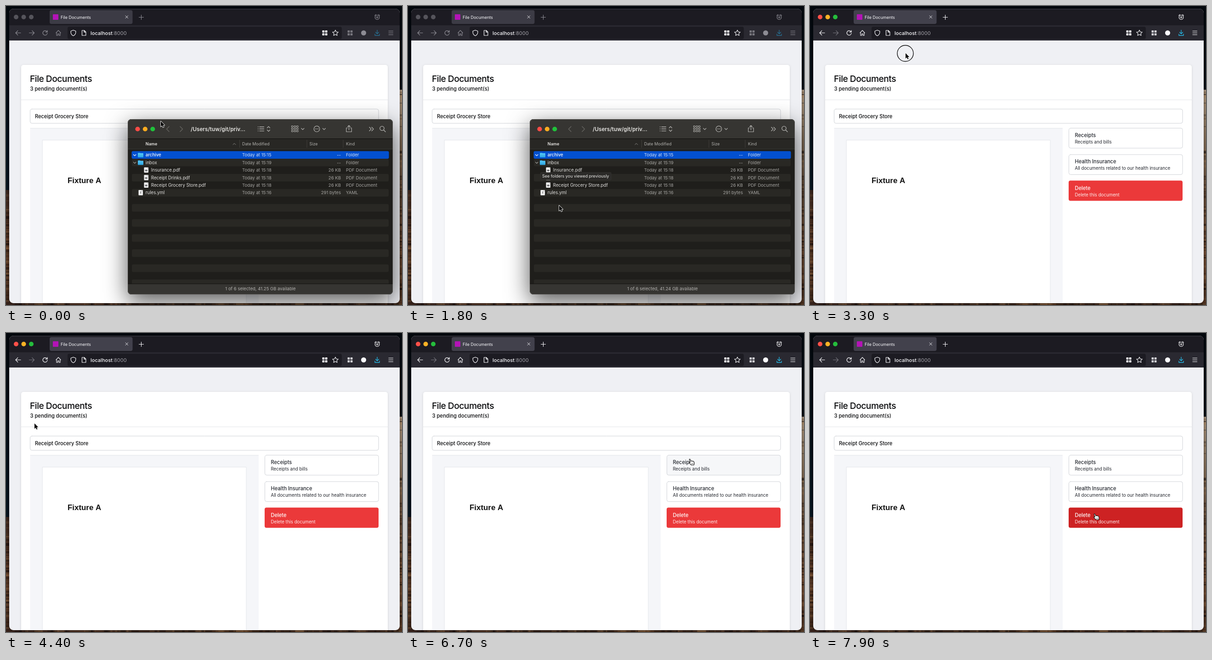
Animation of 862x650 px, one loop 8 s. Source, as an HTML page with a canvas:

```html
<!DOCTYPE html>
<html lang="en">
<head>
<meta charset="utf-8">
<title>File Documents</title>
<style>
  html, body { margin: 0; width: 100%; height: 100%; overflow: hidden; background: #02060c; }
  canvas { display: block; width: 862px; height: 650px; }
</style>
</head>
<body>
<canvas id="stage" width="862" height="650"></canvas>
<script>
const ctx = document.getElementById('stage').getContext('2d');
const LOOP = 8000, FOCUS_AT = 3300;
const SANS = 'Inter, "Open Sans", sans-serif';

// ---------- drawing helpers ----------
function rect(x, y, w, h, fill, radius = 0, stroke) {
  ctx.beginPath();
  ctx.roundRect(x, y, w, h, radius);
  if (fill) { ctx.fillStyle = fill; ctx.fill(); }
  if (stroke) { ctx.strokeStyle = stroke; ctx.lineWidth = 1; ctx.stroke(); }
}
function circle(x, y, r, fill, stroke, width = 1.2) {
  ctx.beginPath();
  ctx.arc(x, y, r, 0, Math.PI * 2);
  if (fill) { ctx.fillStyle = fill; ctx.fill(); }
  if (stroke) { ctx.strokeStyle = stroke; ctx.lineWidth = width; ctx.stroke(); }
}
function icon(path, color, width = 1.2) {
  ctx.strokeStyle = color;
  ctx.lineWidth = width;
  ctx.lineCap = ctx.lineJoin = 'round';
  ctx.stroke(new Path2D(path));
}
// y is the middle of the capital letters
function text(str, x, y, size, color, { weight = 400, align = 'left', spacing = 0, family = SANS } = {}) {
  ctx.font = `${weight} ${size}px ${family}`;
  ctx.letterSpacing = spacing + 'px';
  ctx.textAlign = align;
  ctx.fillStyle = color;
  ctx.fillText(str, x, y + size * 0.36);
}
function withShadow(color, blur, dy, draw) {
  ctx.save();
  ctx.shadowColor = color;
  ctx.shadowBlur = blur;
  ctx.shadowOffsetY = dy;
  draw();
  ctx.restore();
}
function shade(x0, y0, x1, y1, ...stops) {
  const g = ctx.createLinearGradient(x0, y0, x1, y1);
  stops.forEach((color, i) => g.addColorStop(i / (stops.length - 1), color));
  return g;
}
function random(seed) {
  return () => (seed = seed * 16807 % 2147483647) / 2147483647;
}

// ---------- desktop ----------
function drawDesktop() {
  rect(0, 0, 862, 650, shade(0, 0, 0, 400, '#03070c', '#04121d'));
  rect(0, 400, 20, 250, shade(0, 400, 0, 650, '#35221a', '#5a3824', '#3a2418'));
  rect(845, 182, 17, 468, shade(0, 182, 0, 650, '#a08d78', '#7a6550', '#5d4533', '#6b4830', '#40281a'));
  rect(0, 640, 862, 10, shade(0, 0, 862, 0, '#35211a', '#4d3020', '#2e1c14', '#54351f', '#38231a', '#4a2e1e'));
  const rnd = random(77);
  for (let i = 0; i < 90; i++) {
    const tone = rnd() < 0.5 ? 'rgba(10,6,4,.3)' : 'rgba(165,120,80,.18)';
    rect(852, 184 + rnd() * 460, 10, 1 + rnd() * 4, tone);
    rect(0, 402 + rnd() * 240, 7, 1 + rnd() * 4, tone);
    rect(rnd() * 862, 646, 4 + rnd() * 18, 4, tone);
  }
}

// ---------- browser ----------
function grid4(x, y, color) {
  for (const dx of [0, 6.2]) for (const dy of [0, 6.2]) rect(x + dx, y + dy, 4.8, 4.8, color, 0.8);
}

function drawChrome(active) {
  const ink = active ? '#fbfbfe' : '#8d8c94';
  const dim = active ? '#76757d' : '#8d8c94';
  rect(7, 6, 850, 36, '#1c1b22', [9, 9, 0, 0]);
  rect(7, 42, 850, 33, '#2a2931');
  const lights = active ? ['#ff5049', '#fdb225', '#25bd3c'] : Array(3).fill('#55545b');
  lights.forEach((c, i) => circle(22 + i * 16.5, 24, 5, c));
  rect(95, 9, 180.5, 30, active ? '#42414c' : '#3c3b45', 4);
  rect(102, 18, 12, 12, '#b313b6', 1);
  text('File Documents', 119, 24.5, 9, '#fbfbfe');
  icon('M260 21l5.6 5.6M265.6 21l-5.6 5.6', '#e2e2e6', 1);
  icon('M289.5 24.5h10M294.5 19.5v10', ink, 1.1);

  circle(808, 24.5, 4.8, null, ink, 1.1);
  icon('M805.6 24.5h4.8M808 22.1v4.8M802.6 20.8l2.6-2.3M813.4 20.8l-2.6-2.3', ink, 1.1);

  icon('M32 58.5H21M25.8 53.7L21 58.5L25.8 63.3', ink);
  icon('M50.5 58.5H61.5M56.7 53.7L61.5 58.5L56.7 63.3', dim);
  icon('M89 55.6A4.9 4.9 0 1 0 90 59M90 53v3.7h-3.7', ink);
  icon('M108.8 58.3L114 53L119.2 58.3M110 57.5V64H112.7V60.5H115.3V64H118V57.5', ink, 1.1);

  rect(134, 45, 597, 27, '#1c1b22', 4);
  icon('M146.5 52.5L151.8 54.5V57.5Q151.5 62.5 146.5 64.8Q141.5 62.5 141.2 57.5V54.5Z', '#fbfbfe');
  icon('M165.5 53H170.3L173.8 56.5V64H165.5ZM170 53V56.8H173.8', '#fbfbfe');
  text('localhost', 184, 59, 11, '#fbfbfe', { weight: 500 });
  const hostWidth = ctx.measureText('localhost').width;
  text(':8000', 184 + hostWidth, 59, 11, '#a3a2a9');
  grid4(688.5, 53, '#fbfbfe');
  icon('M717 52.3L718.9 56.3L723.2 56.8L720 59.8L720.9 64.1L717 62L713.1 64.1L714 59.8L710.8 56.8L715.1 56.3Z', '#fbfbfe', 1.1);
  grid4(743.5, 53, active ? '#d0d0d5' : '#77767d');
  circle(778.5, 58.5, 5.5, ink);
  icon('M808 52.5V60M804.5 57L808 60.5L811.5 57M803 61V64H813V61', active ? '#27b9e6' : '#276e91', 1.3);
  icon('M833 54.5h9.5M833 58.5h9.5M833 62.5h9.5', ink, 1.1);
}

const BUTTONS = [
  { y: 265, title: 'Receipts', note: 'Receipts and bills' },
  { y: 322.5, title: 'Health Insurance', note: 'All documents related to our health insurance' },
  { y: 380, title: 'Delete', note: 'Delete this document', danger: true },
];
const INPUT = { x: 52.5, y: 224, w: 758.5, h: 31 };
const inside = (p, x, y, w, h) => p.x >= x && p.x < x + w && p.y >= y && p.y < y + h;
const overButton = (p, b) => inside(p, 563, b.y, 248, 44);

function drawButton(b, hover) {
  if (b.danger) rect(563, b.y - 0.5, 248, 44, hover ? '#cd2223' : '#eb393a', 4);
  else rect(563.5, b.y + 0.5, 247.5, 43.5, hover ? '#f6f7f9' : '#fff', 4, '#d0d3d8');
  text(b.title, 576.5, b.y + 16, 11.1, b.danger ? '#fff' : '#25282f', { weight: 500 });
  text(b.note, 576.5, b.y + 30.5, 9.7, b.danger ? '#fdeeee' : '#25282f');
}

function drawBrowser(active, pointer) {
  withShadow('rgba(0,0,0,.35)', 6, 1, () => rect(7, 6, 850, 640, '#eff0f4', 9));
  drawChrome(active);
  ctx.save();
  ctx.beginPath();
  ctx.roundRect(7, 75, 850, 571, [0, 0, 9, 9]);
  ctx.clip();
  withShadow('rgba(0,0,0,.13)', 4, 1, () => rect(33, 128, 798, 540, '#fff', 5));
  text('File Documents', 52, 158, 19.2, '#08090b', { weight: 500, spacing: -0.5 });
  text('3 pending document(s)', 52.5, 179.5, 11.15, '#08090b', { weight: 500 });
  rect(33, 203.5, 798, 1, '#e4e6ea');
  rect(INPUT.x, INPUT.y, INPUT.w, INPUT.h, '#fff', 4, '#cfd2d7');
  text('Receipt Grocery Store', 63, 240, 11.05, '#08090b', { weight: 500 });

  rect(52.5, 265.5, 497.5, 400, '#f5f6f9', 3);
  rect(52.5, 265, 497.5, 1.5, '#eaecef');
  rect(79.5, 291.5, 443.5, 380, '#fff', 0, '#e3e5ea');
  text('Fixture A', 134, 378.5, 16.9, '#111', { weight: 700, family: '"Liberation Sans", sans-serif' });
  BUTTONS.forEach(b => drawButton(b, active && overButton(pointer, b)));
  ctx.restore();
  rect(15, 6, 834, 1, 'rgba(150,150,160,.3)');
}

// ---------- file manager ----------
const FILES = [
  { name: 'archive', folder: true, time: '15:15', size: '--', kind: 'Folder' },
  { name: 'inbox', folder: true, time: '15:19', size: '--', kind: 'Folder' },
  { name: 'Insurance.pdf', indent: true, time: '15:18', size: '26 KB', kind: 'PDF Document' },
  { name: 'Receipt Drinks.pdf', indent: true, time: '15:18', size: '26 KB', kind: 'PDF Document' },
  { name: 'Receipt Grocery Store.pdf', indent: true, time: '15:18', size: '26 KB', kind: 'PDF Document' },
  { name: 'rules.yml', time: '15:16', size: '291 bytes', kind: 'YAML' },
];

function drawFile(f, i) {
  const y = 324 + i * 16.4, selected = i === 0;
  const soft = selected ? '#d5e2fa' : '#a5a4a1', x = f.indent ? 300 : 288;
  if (f.folder) {
    icon(`M277.5 ${y - 1}l2.7 2.7l2.7-2.7`, selected ? '#fff' : '#a5a4a1', 1.2);
    rect(287, y - 5, 5.5, 4, '#2b9fdd', 1);
    rect(287, y - 4, 12, 9, shade(0, y - 4, 0, y + 5, '#57c8f7', '#2ba5e3'), 1);
  } else {
    rect(x + 0.5, y - 6, 9.5, 11.5, '#f2f2f2', 1);
    ctx.fillStyle = '#b8b8b8';
    ctx.fill(new Path2D(`M${x + 7} ${y - 6}l3 3h-3z`));
    if (f.indent) rect(x + 2.5, y - 1, 5.5, 3.5, '#77777a', 1);
    else rect(x + 4.8, y - 3, 1.2, 5, '#555');
  }
  text(f.name, f.indent ? 315.8 : 303.8, y, 9.7, selected ? '#fff' : '#e2e1df', { weight: selected ? 500 : 400 });
  text('Today at ' + f.time, 514, y, 9.6, soft);
  text(f.size, 729, y, 9.6, soft, { align: 'right' });
  text(f.kind, 740, y, 9.6, soft);
}

function drawFinder(t) {
  withShadow('rgba(0,0,0,.66)', 50, 15, () => rect(265, 246, 577, 381, '#1f1e1b', 8));
  rect(265, 246, 577, 43, '#363532', [8, 8, 0, 0]);
  rect(265, 288, 577, 1, '#0e0d0c');
  rect(265, 289, 577, 22, '#282724');
  rect(265, 310.5, 577, 1, '#3b3a37');

  ['#fe4c47', '#fbac20', '#20c23b'].forEach((c, i) => circle(286.5 + i * 16.4, 267.5, 5.1, c));
  icon('M355 262l-5.5 5.5l5.5 5.5M379 262l5.5 5.5l-5.5 5.5', '#666561', 1.4);
  text('/Users/tuw/git/priv...', 402, 267.5, 11.7, '#e6e5e2', { weight: 600 });
  const ink = '#b1b0ad';
  icon('M552 262.8h9.5M552 267.2h9.5M552 271.6h9.5M548.5 262.8h.6M548.5 267.2h.6M548.5 271.6h.6', ink, 1.4);
  icon('M568.5 265l3-3l3 3M568.5 269.5l3 3l3-3', ink, 1.3);
  for (let i = 0; i < 9; i++) {
    rect(621.5 + i % 3 * 5.5, 260.5 + Math.floor(i / 3) * 5, 3.7, 3, null, 0.5, ink);
  }
  icon('M643 266l2.9 2.9l2.9-2.9M689.5 266l2.9 2.9l2.9-2.9', ink, 1.3);
  circle(676.5, 267.2, 6.3, null, ink);
  for (const x of [673.5, 676.5, 679.5]) circle(x, 267.2, 0.9, ink);
  icon('M743.5 265H740.8V273.5H752.2V265H749.5M746.5 269.5V259.8M743.6 262.5L746.5 259.6L749.4 262.5', ink);
  icon('M791 263.5l4 4l-4 4M796 263.5l4 4l-4 4', ink, 1.3);
  circle(818.5, 266, 4.6, null, ink, 1.4);
  icon('M822 269.5l4 4', ink, 1.5);

  text('Name', 303.8, 299.5, 9, '#e9e8e5', { weight: 600 });
  icon('M494 301.5l3-3l3 3', '#8d8c89', 1);
  text('Date Modified', 514, 299.5, 9, ink);
  text('Size', 660.5, 299.5, 9, ink);
  text('Kind', 740, 299.5, 9, ink);
  for (const x of [508, 654.5, 733.5]) rect(x, 291, 1, 17, '#403f3b');

  ctx.save();
  ctx.beginPath();
  ctx.rect(265, 311, 577, 293);
  ctx.clip();
  for (let i = 1; i < 18; i += 2) rect(274, 315.8 + i * 16.4, 559, 16.4, '#292824', 3);
  rect(273.5, 315.5, 560, 16.5, '#0350cf', 3);
  FILES.forEach(drawFile);
  ctx.restore();

  rect(265, 604, 577, 23, '#363532', [0, 0, 8, 8]);
  rect(265, 603.5, 577, 1, '#11100f');
  text(`1 of 6 selected, ${t < 1000 ? '41.25' : '41.24'} GB available`, 554, 615, 9.55, '#b4b3b0', { align: 'center' });
  rect(265.5, 246.5, 576, 380, null, 8, 'rgba(150,148,142,.25)');
  if (t >= 1000) {
    rect(288.5, 362, 153.5, 16, '#2b2a28', 1, '#343330');
    text('See folders you viewed previously', 292, 370, 9, '#eeedeb');
  }
}

// ---------- pointer ----------
// [time, x, y]
const PATH = [
  [0, 337, 250], [100, 337, 250], [900, 296, 346], [1300, 296, 346],
  [1800, 329, 433], [2500, 329, 433], [3150, 208, 102], [3550, 208, 102],
  [4300, 62, 196], [4450, 62, 196], [5150, 188, 235.5], [6000, 188, 235.5],
  [6700, 612, 274], [6950, 612, 274], [7800, 618, 393], [8000, 618, 393],
];
function pointerAt(t) {
  const i = PATH.findIndex(k => k[0] > t);
  const [t0, x0, y0] = PATH[i - 1], [t1, x1, y1] = PATH[i];
  const u = (t - t0) / (t1 - t0), e = u * u * (3 - 2 * u);
  return { x: x0 + (x1 - x0) * e, y: y0 + (y1 - y0) * e };
}

const ARROW = new Path2D('M0 .5V12.2L2.7 9.7L4.6 13.8L6.5 12.9L4.7 9H8.2Z');
const HAND = new Path2D('M.2.6Q1.2-.6 2.3.6L4 4.6Q5.2 3.6 6.2 4.7Q7.4 3.8 8.3 5Q9.8 4.4 10.4 6L11.3 9Q11.5 11 10.3 13H4.7Q2.5 11 .2 8.7Q-1 7 .4 6.6Q1.3 6.6 2.4 7.5Z');
const BEAM = 'M-2.8-7.5Q0-7.5 0-5.5V5.5Q0 7.5-2.8 7.5M2.8-7.5Q0-7.5 0-5.5M2.8 7.5Q0 7.5 0 5.5';

function drawPointer(p, active) {
  ctx.save();
  ctx.translate(p.x, p.y);
  ctx.lineJoin = 'round';
  if (active && inside(p, INPUT.x, INPUT.y, INPUT.w, INPUT.h)) {
    icon(BEAM, '#fff', 2.4);
    icon(BEAM, '#111', 1.1);
  } else if (active && BUTTONS.some(b => overButton(p, b))) {
    ctx.fillStyle = '#fff';
    ctx.strokeStyle = '#111';
    ctx.lineWidth = 1.1;
    ctx.fill(HAND);
    ctx.stroke(HAND);
    icon('M5.5 8.8v2.4M7.3 8.8v2.4M9 8.8v2.4', '#333', 0.6);
  } else {
    ctx.strokeStyle = '#fff';
    ctx.lineWidth = 1.7;
    ctx.stroke(ARROW);
    ctx.fillStyle = '#000';
    ctx.fill(ARROW);
  }
  ctx.restore();
}

// ---------- playback ----------
function render(now) {
  const t = now % LOOP, active = t >= FOCUS_AT, pointer = pointerAt(t);
  drawDesktop();
  drawBrowser(active, pointer);
  if (!active) drawFinder(t);
  if (active && t < FOCUS_AT + 200) circle(207.5, 103, 17.5, null, '#111', 1.4);
  drawPointer(pointer, active);
  requestAnimationFrame(render);
}
requestAnimationFrame(render);
</script>
</body>
</html>
```
